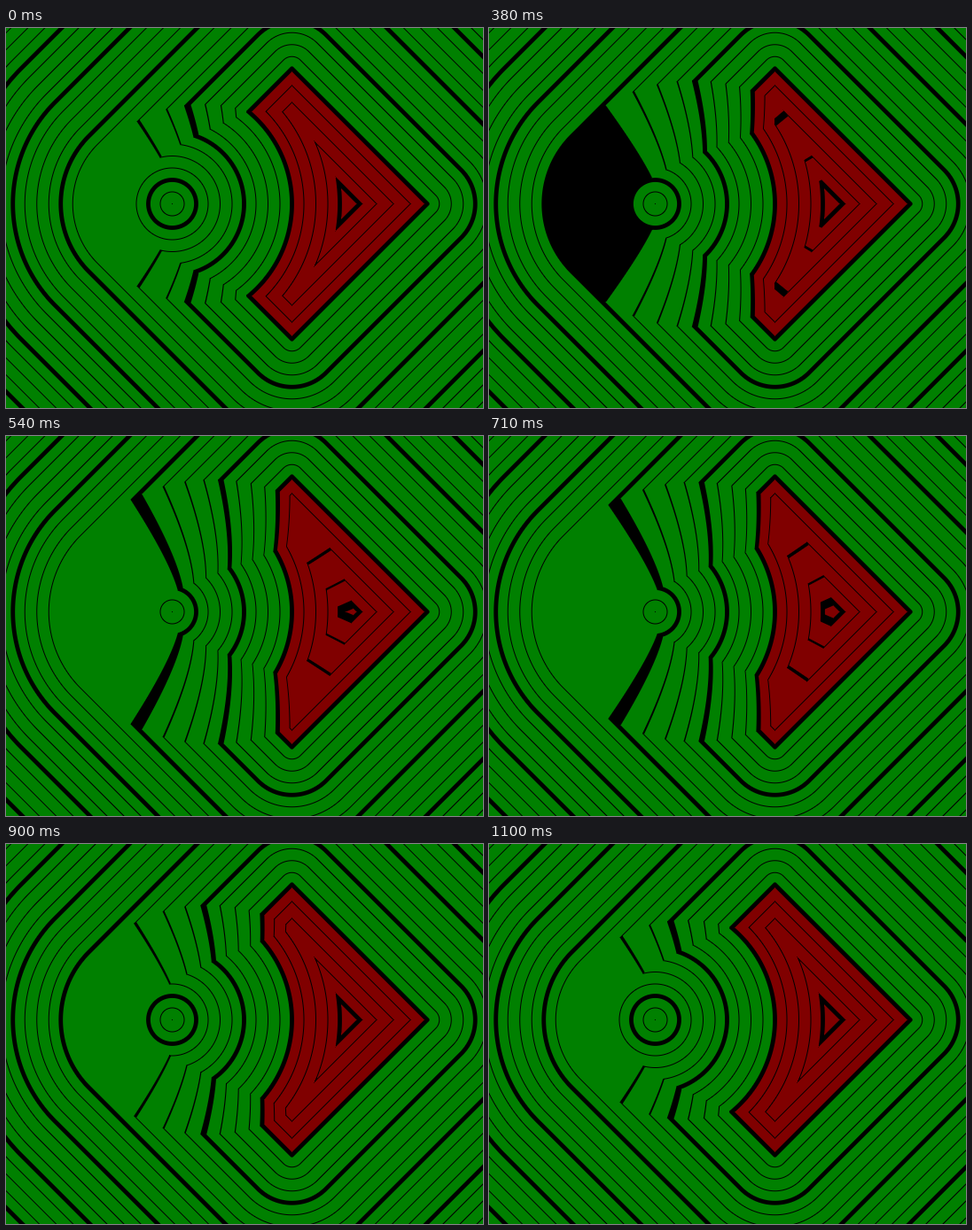
An HTML page with a canvas for the animation above (1180 ms loop, 538 px wide and 429 px high).

```html
<!DOCTYPE html>
<html lang="en">
<head>
<meta charset="utf-8">
<title>Chamfered difference distance field</title>
<style>
  html, body { margin: 0; width: 100%; height: 100%; overflow: hidden; background: #008000; }
  canvas { display: block; }
</style>
</head>
<body>
<canvas id="view" width="538" height="429"></canvas>
<script>
const W = 538, H = 429, UNIT = 54, GAP = UNIT / 4, STRIDE = W + 1;
const LOOP = 1180, MAX_RADIUS = 47;
const ctx = document.getElementById("view").getContext("2d");
const image = ctx.createImageData(W, H);
const pixels = new Uint32Array(image.data.buffer);

// Moments at which the picture steps on
const steps = [0, 30, 80, 120, 170, 210, 240, 290, 330, 380, 420, 460, 500, 540,
  590, 640, 700, 750, 800, 850, 890, 930, 970, 1020, 1060, 1100];
// Time in ms and phase in degrees of the chamfer's swing
const phases = [[0, 0], [210, 61], [380, 114.4], [540, 163], [800, 248.3],
  [970, 299], [1100, 360], [LOOP, 360]];

// Fields of the turned square and of the outside of the circle
const size = STRIDE * (H + 1);
const square = new Float64Array(size);
const hole = new Float64Array(size);
const field = new Float64Array(size);

function squareDistance(x, y) {
  const u = Math.abs(x + y) * Math.SQRT1_2 - 2 * UNIT;
  const v = Math.abs(x - y) * Math.SQRT1_2 - 2 * UNIT;
  return Math.hypot(Math.max(u, 0), Math.max(v, 0)) + Math.min(Math.max(u, v), 0);
}

for (let y = 0, i = 0; y <= H; y++) {
  for (let x = 0; x <= W; x++, i++) {
    const px = x + 0.5, py = y + 0.5 - 198.5;
    square[i] = squareDistance(px - 322.5, py);
    hole[i] = 2.5 * UNIT - Math.hypot(px - 187.5, py);
  }
}

function chamferRadius(t) {
  const n = phases.findIndex(p => p[0] > t);
  const [t0, a0] = phases[n - 1], [t1, a1] = phases[n];
  const angle = a0 + (a1 - a0) * (t - t0) / (t1 - t0);
  return MAX_RADIUS * (1 - Math.cos(angle * Math.PI / 180)) / 2;
}

function draw(radius) {
  for (let i = 0; i < size; i++) {
    const a = square[i], b = hole[i];
    field[i] = Math.max(a, b, (a + b + radius) * Math.SQRT1_2);
  }
  for (let y = 0, p = 0; y < H; y++) {
    for (let x = 0; x < W; x++, p++) {
      const i = y * STRIDE + x, d = field[i];
      const slope = Math.hypot(field[i + 1] - d, field[i + STRIDE] - d) + 1e-4;
      const line = Math.round(d / GAP);
      const half = line % 4 ? 0.5 : 2.4;
      const ink = (half - Math.abs(d - line * GAP)) / slope + 0.5;
      const shade = Math.round(128 * (1 - Math.min(1, Math.max(0, ink))));
      pixels[p] = (0xff000000 | (d < 0 ? shade : shade << 8)) >>> 0;
    }
  }
  ctx.putImageData(image, 0, 0);
}

let shown = -1;
function tick() {
  const t = performance.now() % LOOP;
  const now = steps.filter(s => s <= t).pop();
  if (now !== shown) draw(chamferRadius(shown = now));
  requestAnimationFrame(tick);
}
tick();
</script>
</body>
</html>
```
